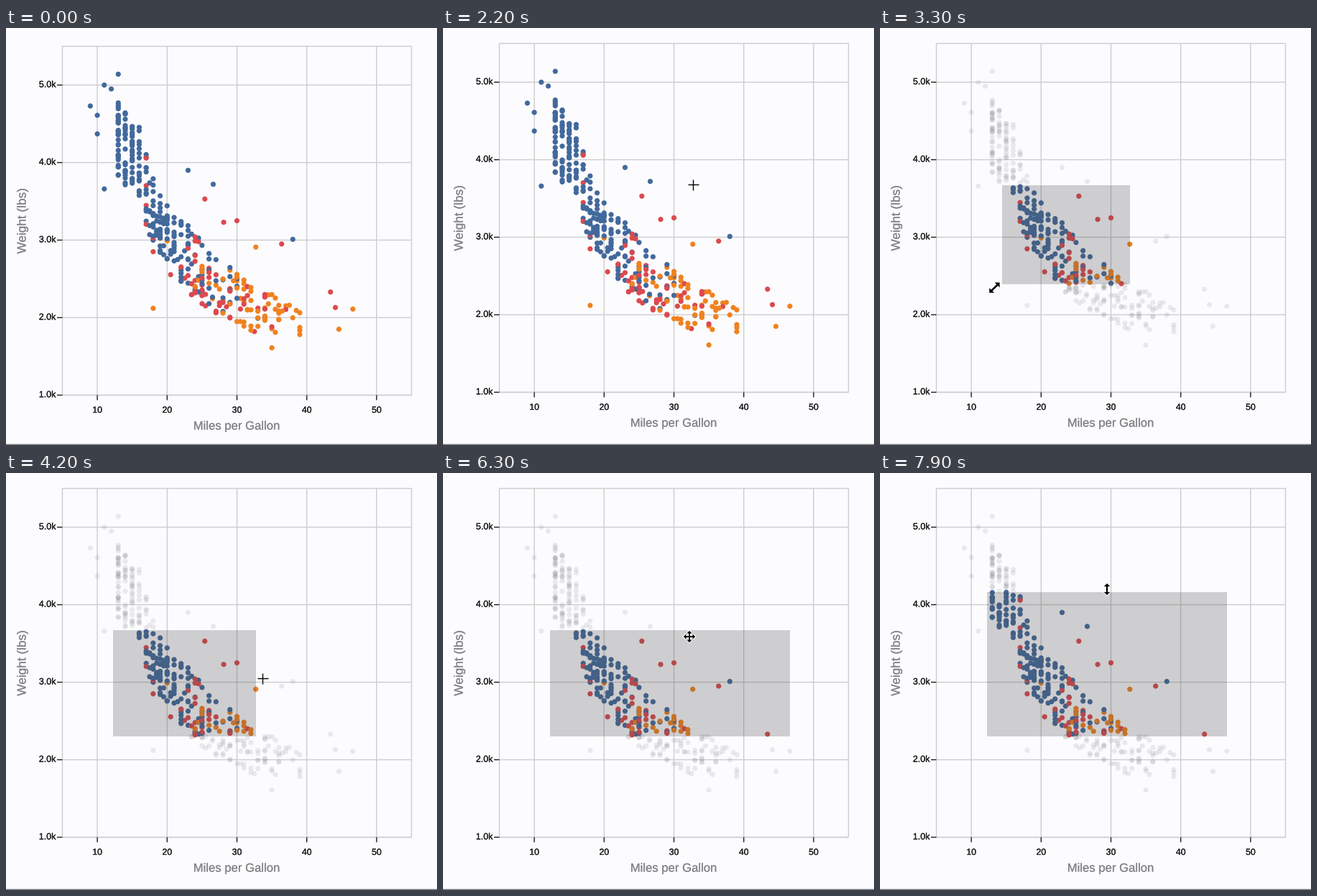
A matplotlib script for the animation above (8000 ms loop, 600 by 581 pixels).

```python
import numpy as np
import matplotlib.pyplot as plt
from matplotlib.animation import FuncAnimation
from matplotlib.colors import to_rgba
from matplotlib.patches import PathPatch, Rectangle
from matplotlib.path import Path
from matplotlib.patheffects import withStroke
from matplotlib.transforms import Affine2D

W, H, DPI = 600, 581, 64
PX = 72 / DPI
FRAMES, STEP = 80, 100
LEFT, TOP, SIZE = 78.5, 21.5, 486
RIGHT, BOTTOM = LEFT + SIZE, TOP + SIZE
BLUE, RED, ORANGE = "#42699c", "#dc494e", "#f0821f"
FADED = (0.5, 0.5, 0.52, 0.15)
BRUSH_START = 2700

rng = np.random.default_rng(7)


def to_stage(mpg, klbs):
    return LEFT + (np.asarray(mpg) - 5) * SIZE / 50, BOTTOM - (np.asarray(klbs) - 1) * 108


def make_cars(color, mpg, shift, outliers):
    """Whole or half mpg values, weights scattered about a falling curve."""
    whole = (mpg < 17) | (rng.random(len(mpg)) < 0.6)
    mpg = np.where(whole, np.floor(mpg), np.round(mpg * 2) / 2)
    typical = np.interp(mpg, [13, 16, 18, 22, 27, 32, 39],
                        [4.25, 3.95, 3.35, 2.85, 2.45, 2.15, 2.0])
    spread = np.interp(mpg, [13, 25, 38], [0.5, 0.4, 0.2])
    klbs = typical + shift + spread * rng.uniform(-1, 1, len(mpg))
    cars = np.vstack([np.column_stack([mpg, klbs]), outliers])
    return cars, np.tile(to_rgba(color), (len(cars), 1))


groups = [
    make_cars(BLUE, 13 + np.abs(rng.normal(0, 8, 235)), 0.03,
              [(9, 4.73), (10, 4.37), (10, 4.61), (11, 5.0), (11, 3.66),
               (12, 4.95), (13, 5.14), (23, 3.9), (26.6, 3.72), (38, 3.01)]),
    make_cars(RED, np.clip(rng.normal(26, 4.5, 60), 17, 37), -0.05,
              [(25.4, 3.53), (28.1, 3.23), (30, 3.25), (36.4, 2.95),
               (43.4, 2.33), (44.1, 2.13)]),
    make_cars(ORANGE, np.clip(rng.normal(31, 5, 70), 19, 39), -0.03,
              [(32.7, 2.91), (46.6, 2.11), (44.6, 1.85), (35, 1.61), (18, 2.12)]),
]
cars = np.vstack([g[0] for g in groups])
colors = np.vstack([g[1] for g in groups])
order = rng.permutation(len(cars))
colors = colors[order]
dot_x, dot_y = to_stage(*cars[order].T)

fig = plt.figure(figsize=(W / DPI, H / DPI), dpi=DPI, facecolor="#fcfbfe")
ax = fig.add_axes([0, 0, 1, 1])
ax.axis("off")
scroll = Affine2D()
chart = scroll + ax.transData


def line(xs, ys, color="#cdcdce", width=1.4, transform=chart, z=1):
    ax.plot(xs, ys, color=color, lw=width * PX, transform=transform, zorder=z,
            solid_capstyle="butt", snap=False)


def label(x, y, text, size, color, weight=0, **style):
    effects = [withStroke(linewidth=weight * PX, foreground=color)]
    ax.text(x, y, text, size=size * PX, color=color, family="Liberation Sans",
            transform=chart, path_effects=effects, **style)


def draw_axes():
    ink, grey = "#1c1c1c", "#848587"
    for k in range(1, 6):
        x, y = to_stage(10 * k, k)
        line([x, x], [TOP, BOTTOM])
        line([LEFT, RIGHT], [y, y])
        line([x, x], [BOTTOM, BOTTOM + 7], ink, z=1.5)
        line([LEFT - 7.5, LEFT], [y, y], ink, z=1.5)
        label(x, 529, str(10 * k), 12.3, ink, 0.25, ha="center", va="center")
        label(69.5, y, f"{k}.0k", 12.5, ink, 0.25, ha="right", va="center")
    line([LEFT, RIGHT, RIGHT, LEFT, LEFT], [TOP, TOP, BOTTOM, BOTTOM, TOP])
    label(321.5, 555.5, "Miles per Gallon", 16.7, grey, 0.15, ha="center", va="baseline")
    label(23, 264.5, "Weight (lbs)", 17.2, grey, 0.15, ha="center", va="center", rotation=90)
    line([0, W], [580.3, 580.3], "#6a6a6c", 1.2, ax.transData)


def double_arrow(length, head, stem, angle):
    tip = length - head
    half = np.array([(-length, 0), (-tip, -head), (-tip, -stem),
                     (tip, -stem), (tip, -head)])
    outline = np.vstack([half, -half, half[:1]])
    return Path(Affine2D().rotate_deg(angle).transform(outline), closed=True)


def cursor(path, filled=True):
    patch = PathPatch(path, facecolor="black" if filled else "none", visible=False,
                      edgecolor="black", lw=(0.2 if filled else 1.4) * PX, zorder=5)
    patch.set_path_effects([withStroke(linewidth=2.5 * PX, foreground="white")])
    return ax.add_patch(patch)


draw_axes()
dots = ax.scatter(dot_x, dot_y, s=(7.2 * PX) ** 2, c=colors, lw=0, zorder=2,
                  transform=chart)
brush = ax.add_patch(Rectangle((0, 0), 0, 0, fc="#464646", alpha=0.25, lw=0, zorder=3))

cross = Path([(-7.5, 0), (7.5, 0), (0, -7.5), (0, 7.5)],
             [Path.MOVETO, Path.LINETO, Path.MOVETO, Path.LINETO])
cursors = {
    "cross": cursor(cross, filled=False),
    "corner": cursor(double_arrow(10, 4.6, 1.2, -45)),
    "side": cursor(double_arrow(8, 4, 1, 0)),
    "edge": cursor(double_arrow(8, 4, 1, 90)),
    "move": cursor(Path.make_compound_path(double_arrow(8, 3.4, 0.9, 0),
                                           double_arrow(8, 3.4, 0.9, 90))),
}

# Start time of each cursor shape
SHAPES = [(1000, "cross"), (BRUSH_START, "corner"), (3600, "move"), (4000, "cross"),
          (4400, "side"), (6200, "move"), (6700, "edge")]

# Turning points of the pointer: time, x, y
TURNS = np.array([
    (1000, 553, 72), (1600, 397, 181), (2200, 348, 218), (2550, 348, 218),
    (2800, 219, 322), (2900, 201, 341), (3400, 149, 367), (3600, 149, 367),
    (4000, 385, 287), (4200, 357, 286), (4700, 348, 286), (6100, 484, 286),
    (6300, 343, 228), (6700, 316, 216), (7200, 316, 216), (7900, 316, 162),
]).T


def pointer(t):
    return [np.interp(t, TURNS[0], axis) for axis in TURNS[1:]]


def brush_box(t):
    left, bottom = pointer(min(t - STEP, 3400))
    right = np.interp(t, [4700, 6100], [348, 483])
    top = np.interp(t, [7200, 7900], [218.5, 166])
    return left, top, right, bottom


def update(frame):
    t = frame * STEP
    scroll.clear().translate(0, np.interp(t, [1700, 1900], [4, 0]))

    shape = next((name for start, name in reversed(SHAPES) if t >= start), None)
    place = Affine2D().translate(*pointer(t)) + ax.transData
    for name, patch in cursors.items():
        patch.set_visible(name == shape)
        patch.set_transform(place)

    brushing = t >= BRUSH_START
    brush.set_visible(brushing)
    shown = colors
    if brushing:
        left, top, right, bottom = brush_box(t)
        brush.set_bounds(left, top, right - left, bottom - top)
        inside = ((dot_x >= left) & (dot_x <= right)
                  & (dot_y >= top) & (dot_y <= bottom))
        shown = np.where(inside[:, None], colors, FADED)
    dots.set_facecolors(shown)
    return [dots, brush, *cursors.values()]


ax.set_xlim(0, W)
ax.set_ylim(H, 0)
anim = FuncAnimation(fig, update, frames=FRAMES, interval=STEP, repeat=True,
                     repeat_delay=0, blit=False)
plt.show()
```
